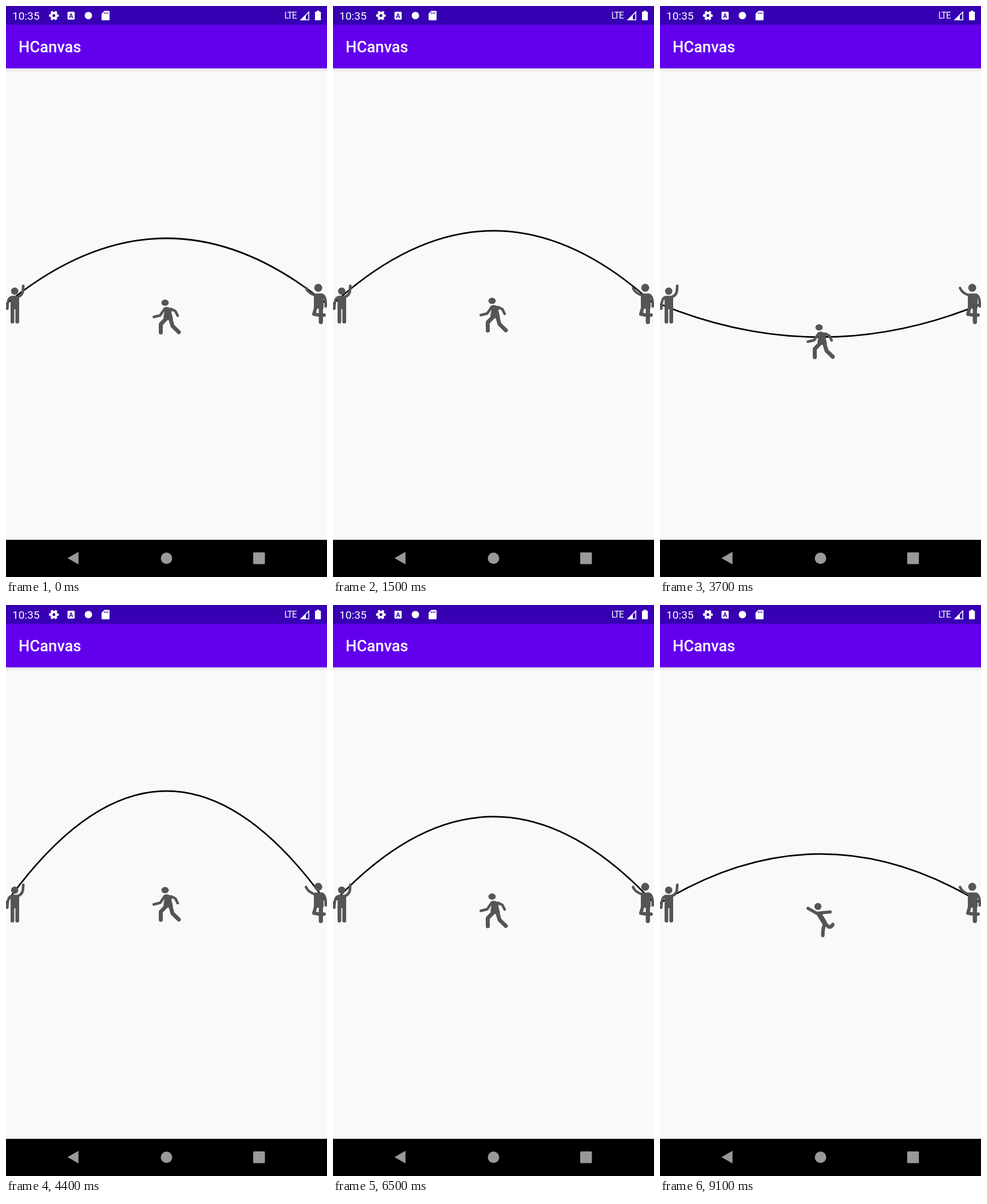
An HTML page that plays this animation: 561 by 998 pixels, repeating every 9.2 s.

```html
<!DOCTYPE html>
<html lang="en">
<head>
<meta charset="utf-8">
<title>Jump rope</title>
<style>
  html, body { margin: 0; width: 100%; height: 100%; overflow: hidden; background: #f9f9f9; }
  svg { display: block; width: 561px; height: 998px; }
  text { font-family: Roboto, "Noto Sans", sans-serif; fill: #fff; }
  .limb { fill: none; stroke: #555; stroke-linecap: round; stroke-linejoin: round; }
  .people { fill: #555; }
</style>
</head>
<body>
<svg viewBox="0 0 561 998">
  <defs>
    <linearGradient id="shade" x2="0" y2="1">
      <stop offset="0" stop-color="#000" stop-opacity=".1"/>
      <stop offset="1" stop-color="#000" stop-opacity="0"/>
    </linearGradient>
  </defs>
  <rect width="561" height="998" fill="#f9f9f9"/>
  <rect y="109" width="561" height="7" fill="url(#shade)"/>

  <path id="rope" fill="none" stroke="#000" stroke-width="2.7"/>

  <g class="people">
    <!-- left turner -->
    <circle cx="15.2" cy="498.3" r="6.4"/>
    <path d="M9 506.5H22Q23 507 23 510V552Q23 555 19.7 555T16.4 552V530H14.4V552Q14.4 555 11.2 555T8 552V510Q8 507 9 506.5Z"/>
    <path class="limb" stroke-width="4.6" d="M20 509Q28 506 29.4 499L30.2 489M8 509.5Q2.6 512 2.2 529"/>

    <!-- right turner -->
    <circle cx="545.7" cy="492.6" r="7"/>
    <path d="M540 502.5H553Q555 503 555 506V527L554 530V552Q554 556 550.3 556T546.6 552V529H538V506Q538 503 540 502.5Z"/>
    <path class="limb" stroke-width="4.6" d="M540 505.5Q528 502 524.4 493M553 505Q559.4 508 558.7 525"/>
    <path class="limb" stroke-width="6" d="M541 528L538 538.5L546 540M555 540.3H556"/>

    <!-- jumper, two poses -->
    <g id="walk">
      <ellipse cx="278" cy="515.3" rx="6.4" ry="5.5"/>
      <path d="M275 525Q278 522 283 523L292 526L289 532L292 544L285 546L277 545L275 541L277 531Z"/>
      <path class="limb" stroke-width="4.6" d="M277 526.5L269.5 537.5L258.3 540.3M289 526.5L296 530L300 538"/>
      <path class="limb" stroke-width="7" d="M281 542L270.5 553V567.3M287 542L291 556L302 566.7"/>
    </g>
    <g id="jump">
      <circle cx="276" cy="505.6" r="6.1"/>
      <path class="limb" stroke-width="5.4" d="M258.7 508.8L274 517.5L297.5 515.2"/>
      <path class="limb" stroke-width="9" d="M278.5 519.5L287 533.5"/>
      <path class="limb" stroke-width="6.2" d="M288 536Q284.5 543 284.6 556.3M288 535L295 541.5Q299.5 542 302 537.2"/>
    </g>
  </g>

  <!-- app and status bars -->
  <rect width="561" height="109" fill="#6200ee"/>
  <rect width="561" height="32.7" fill="#3700b3"/>
  <text x="22" y="81" font-size="27.3" font-weight="500">HCanvas</text>
  <text x="11" y="23.8" font-size="19.2">10:35</text>
  <text x="486.5" y="22.2" font-size="15.6" letter-spacing="-1.2">LTE</text>
  <g fill="#fff">
    <circle cx="83.7" cy="16.7" r="4.5" fill="none" stroke="#fff" stroke-width="4"/>
    <circle cx="83.7" cy="16.7" r="7" fill="none" stroke="#fff" stroke-width="3" stroke-dasharray="4 3.33" stroke-dashoffset="2"/>
    <rect x="107.5" y="10" width="12.5" height="13.8" rx="1.5"/>
    <circle cx="144" cy="16.7" r="6.5"/>
    <path d="M172 8.5H179.5Q181 8.5 181 10V23.5Q181 25 179.5 25H168.5Q167 25 167 23.5V13.5Z"/>
    <path d="M513.5 25L530 8.5V25Z"/>
    <path d="M540 10.8Q540 10 541 10H543V8.3H547.5V10H549.3Q550.3 10 550.3 10.8V24Q550.3 25 549.3 25H541Q540 25 540 24Z"/>
  </g>
  <path d="M524 16.8L528.4 12.6V23.4H524Z" fill="#3700b3"/>
  <path d="M172 11V14M175 11V14M178 11V14" stroke="#3700b3" stroke-width="1.3"/>
  <text x="113.8" y="20.8" font-size="11" font-weight="700" text-anchor="middle" style="fill:#3700b3">A</text>

  <!-- navigation bar -->
  <rect y="933" width="561" height="65"/>
  <g fill="#999">
    <path d="M107.5 965L126.7 954V976Z"/>
    <circle cx="280.5" cy="965.3" r="10"/>
    <rect x="432" y="955" width="20.5" height="20.5" rx="1.5"/>
  </g>
</svg>
<script>
  const LOOP = 9200, STEP = 100, MID = 521, SWING = 206;
  // time in ms, swing phase: even = rope at the top, odd = at the bottom
  const beats = [
    [0, -0.47], [1500, 2.435], [3700, 6.8], [5200, 9.709],
    [6500, 12.365], [7700, 14.737], [9000, 17.3], [9100, 17.46]
  ];
  const [rope, walk, jump] = ['rope', 'walk', 'jump'].map(id => document.getElementById(id));

  function phaseAt(t) {
    let i = 1;
    while (i < beats.length - 1 && t > beats[i][0]) i++;
    const [t0, p0] = beats[i - 1], [t1, p1] = beats[i];
    return p0 + (p1 - p0) * (t - t0) / (t1 - t0);
  }

  function place(figure, shown, y) {
    figure.setAttribute('visibility', shown ? 'visible' : 'hidden');
    figure.setAttribute('transform', `translate(0 ${y})`);
  }

  function draw(t) {
    const phase = phaseAt(t);
    const turn = (phase + 2) % 2;
    const rising = turn > 1;
    const drop = rising ? 2 - turn : turn;
    const sag = SWING * (2 * drop * drop - 1);  // accelerates away from the top
    const leaping = rising && phase > 0;
    rope.setAttribute('d', `M0 ${MID}Q280.5 ${MID + 2 * sag} 561 ${MID}`);
    place(walk, !leaping, (sag + 128) / 4);
    place(jump, leaping, (sag + 171) / 4);
  }

  function tick() {
    draw(Math.floor(performance.now() % LOOP / STEP) * STEP);
    requestAnimationFrame(tick);
  }
  tick();
</script>
</body>
</html>
```
